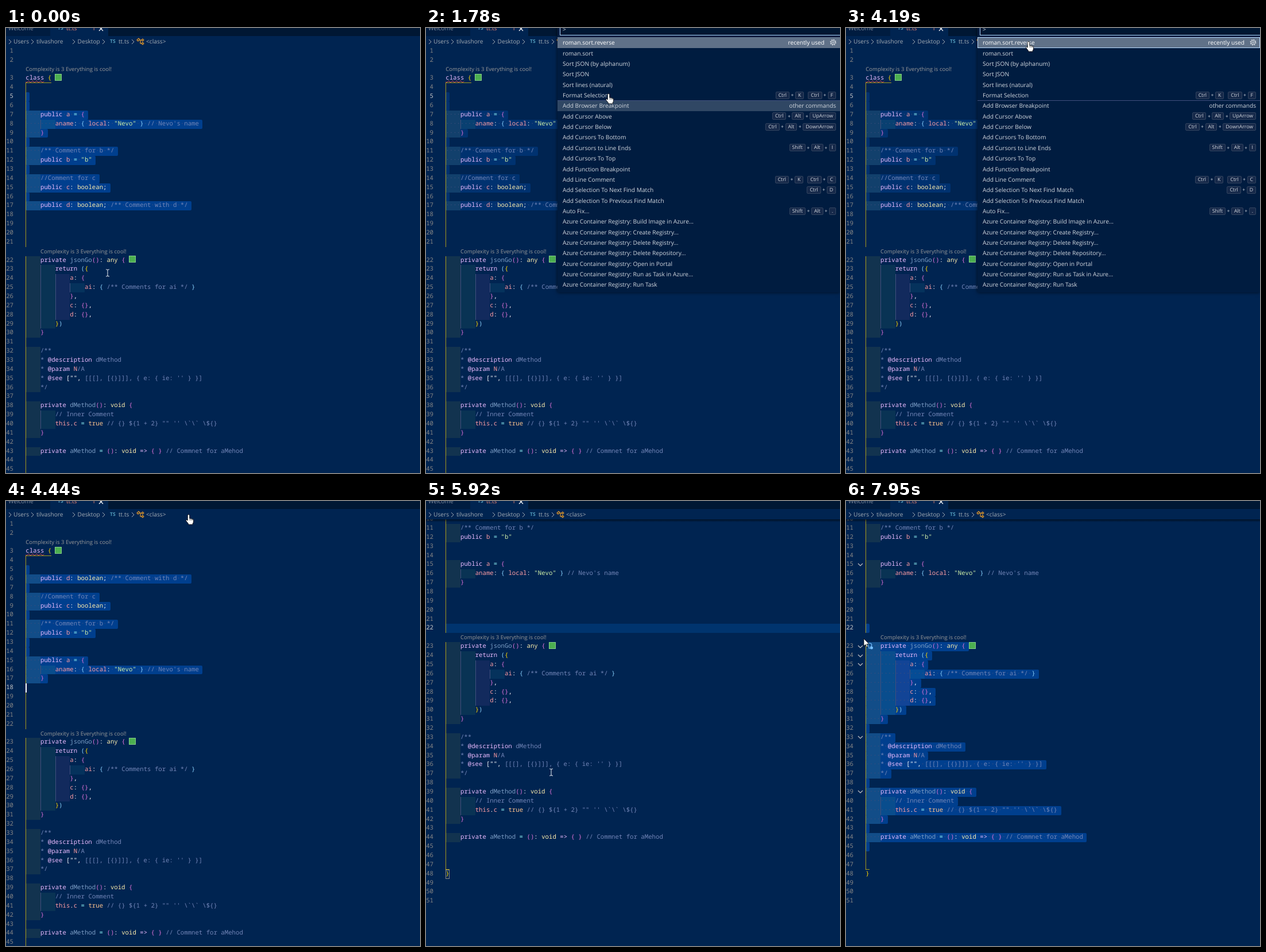
Recreate the animation shown at these times as an HTML page. Size 721x776 px, loop 8 s.

```html
<!DOCTYPE html>
<html lang="en">
<head>
<meta charset="utf-8">
<title>Sorting class members</title>
<style>
html, body { margin: 0; width: 100%; height: 100%; overflow: hidden; background: #002451; }
#stage { position: relative; width: 721px; height: 776px; overflow: hidden; background: #002451;
  font: 10.2px/18px "Open Sans", "Noto Sans", sans-serif; text-rendering: geometricPrecision; }
#stage div, #stage svg { position: absolute; white-space: pre; }
svg { overflow: visible; fill: none; }
#tabs { left: 0; top: 0; width: 721px; height: 14px; background: #001733; overflow: hidden; }
#crumbs { left: 0; top: 14px; height: 18px; color: #a3abb4; }
.ts { color: #519aba; font-weight: bold; font-size: 8.6px; }
#editor { left: 0; top: 32px; width: 721px; height: 744px; overflow: hidden; }
.row { left: 0; width: 721px; height: 15.86px; line-height: 15.86px;
  font-family: "Noto Sans Mono", "DejaVu Sans Mono", monospace; font-size: 10.7px; }
.row > div { top: 0; height: 100%; }
.num { right: 708px; color: #858585; }
.num.on { color: #c6c6c6; }
.code { left: 34.3px; color: #fff; }
.code i { font-style: normal; color: #404f7d; }
.error { text-decoration: underline wavy #f14c4c 1px; text-underline-offset: 1px; }
.sel { border-radius: 2px; }
.row > .lens { font: 9.57px/15.86px "Open Sans", "Noto Sans", sans-serif; color: #999; }
.row > .badge { top: -.4px; width: 10px; height: 10px; background: #4caf50; border: 1px solid #86cf89; }
.row > .match { top: .5px; width: 5.4px; height: 13.5px; border: 1px solid #888; }
#shade { left: 0; top: 32px; width: 721px; height: 5px; background: linear-gradient(#0008, #0000); }
#palette { left: 229px; top: -10px; width: 492px; height: 471px; background: #001c40;
  box-shadow: 0 0 6px #000a; color: #d3d8df; }
#input { left: 4px; top: 0; width: 500px; height: 21px; border: 1px solid #bbdaff; background: #001733; }
.item { left: 0; width: 492px; height: 18.35px; line-height: 18.35px; }
.item > div { top: 0; }
.item.hover { background: #304764; }
.item.focus { background: #607188; color: #fff; }
.item.outline { box-shadow: inset 0 0 0 1px #bbdaff; }
#stage .keys { right: 7px; display: flex; align-items: center; height: 18.35px; font-size: 8.7px; }
.keys b { font-weight: normal; height: 11px; line-height: 11px; padding: 0 4px; border-radius: 2px;
  border: 1px solid #33445f; background: #16294a; }
.keys span { margin: 0 2.5px; }
.keys em { width: 7px; }
</style>
</head>
<body>
<div id="stage">
  <div id="tabs"></div>
  <div id="crumbs"></div>
  <div id="editor"></div>
  <div id="shade"></div>
  <div id="palette"></div>
  <svg id="pointer" width="1" height="1"></svg>
</div>
<script>
const LOOP = 8000, ROW = 15.86, CHAR = 6.42, LEFT = 34.3, NOTCH = 41.8, ITEM = 18.35;
const $ = id => document.getElementById(id);
const box = (cls, left, style = '', html = '') => `<div class="${cls}" style="left:${left}px;${style}">${html}</div>`;
const svg = (x, y, body) => `<svg width="1" height="1" style="left:${x}px;top:${y}px">${body}</svg>`;
const path = (d, stroke, width = 1, fill = 'none') =>
  `<path d="${d}" stroke="${stroke}" stroke-width="${width}" fill="${fill}"/>`;

// Document text
const membersA = `    public a = {
        aname: { local: "Nevo" } // Nevo's name
    }`;
const membersB = `    /** Comment for b */
    public b = "b"`;
const membersC = `    //Comment for c
    public c: boolean;`;
const membersD = `    public d: boolean; /** Comment with d */`;
const tail = `    private jsonGo(): any {
        return ({
            a: {
                ai: { /** Comments for ai */ }
            },
            c: {},
            d: {},
        })
    }

    /**
    * @description dMethod
    * @param N/A
    * @see ["", [[[], [{}]]], { e: { ie: '' } }]
    */

    private dMethod(): void {
        // Inner Comment
        this.c = true // {} \${1 + 2} "" '' \\\`\\\` \\\${}
    }

    private aMethod = (): void => { } // Commnet for aMehod



}


`;
const blank = n => '\n'.repeat(n);
const before = ('\n\nclass {' + blank(4) + [membersA, membersB, membersC, membersD].join('\n\n') + blank(5) + tail).split('\n');
const after = ('\n\nclass {' + blank(3) + [membersD, membersC, membersB].join('\n\n') + blank(3) + membersA + blank(6) + tail).split('\n');

// Syntax colours
const COMMENT = '#7285b7', KEYWORD = '#ebbbff', VARIABLE = '#ff9da4';
const TOKEN = /(\/\/.*|\/\*.*?\*\/)|("[^"]*")|\b(class|public|private|return)\b|(=>)|\b(boolean|any|void)\b|\b(true)\b|\b(jsonGo|dMethod|aMethod)\b|(\w+)|(=)|([(){}])|(.)/g;
const COLORS = [COMMENT, '#d1f1a9', KEYWORD, KEYWORD, '#ffeead', '#ffc58f', '#7c9dc5', VARIABLE, '#9ff', '', '#fff'];
const DOC = /(@\w+)|(\["",)|(N)(?=\/A)|([^@N\[]+|.)/g;
const DOC_COLORS = [KEYWORD, '#fff', VARIABLE, COMMENT];
const BRACKETS = ['gold', 'orchid', 'lightskyblue'];

function tokenize(lines) {
  let depth = 0;
  return lines.map(line => {
    const doc = /^\s*(\/\*\*$|\*)/.test(line);
    return [...line.matchAll(doc ? DOC : TOKEN)].map(m => {
      const kind = m.slice(1).findIndex(g => g !== undefined);
      let color = (doc ? DOC_COLORS : COLORS)[kind];
      if (!color) color = BRACKETS[('({'.includes(m[0]) ? depth++ : --depth) % 3];
      return { text: m[0], start: m.index, color };
    });
  });
}
const docs = [before, after].map(lines => ({ lines, tokens: tokenize(lines) }));

const escapeChar = c => ({ '<': '&lt;', '>': '&gt;', '&': '&amp;' })[c] || c;
const tokenHtml = (tok, from) => {
  const chars = [...tok.text].map((c, i) => c === ' ' && tok.start + i >= from ? '<i>·</i>' : escapeChar(c));
  return `<span${tok.text === 'class' ? ' class="error"' : ''} style="color:${tok.color}">${chars.join('')}</span>`;
};

const TINTS = ['255,255,64', '127,255,127', '255,127,255', '79,236,236'];
const GUIDE = 'rgba(255,215,0,.65)';
const colX = col => LEFT + col * CHAR;

function lineHtml(s, doc, i) {
  const line = doc.lines[i], n = i + 1;
  const open = doc.lines.indexOf('class {'), close = doc.lines.indexOf('}');
  const selected = s.sel && n >= s.sel[0] && n <= s.sel[2];
  const from = selected ? (n === s.sel[0] ? s.sel[1] : 0) : Infinity;
  let h = '';
  if (s.current === n) h += box('', 34, 'width:687px;background:#00346e');
  if (selected) h += box('sel', colX(from),
    `width:${(line.length - from + 1) * CHAR}px;background:${s.palette ? '#003270' : '#003f8e'}`);
  const levels = line.trim() ? line.search(/\S/) / 4 : 0;
  for (let k = 0; k < levels; k++) {
    h += box('', colX(4 * k), `width:${4 * CHAR}px;background:rgba(${TINTS[k]},.07)`);
    if (k) h += box('', colX(4 * k), 'width:1px;background:#404f7d');
  }
  if (i > open && i < close) h += box('', 34, `width:1px;background:${GUIDE}`);
  if (i === open) h += box('', 34, `top:14.8px;height:1px;width:45px;background:${GUIDE}`);
  if (i === close) h += box('', 34, `top:-.5px;height:1px;width:7px;background:${GUIDE}`);
  if (s.match && (i === open || i === close)) h += box('match', colX(line.length - 1) - .4);
  h += `<div class="num${s.head[0] === n ? ' on' : ''}">${n}</div>`;
  h += `<div class="code">${doc.tokens[i].map(t => tokenHtml(t, from)).join('')}</div>`;
  if (/class|jsonGo/.test(line)) h += box('badge', colX(line.length) + 6);
  if (s.caret && s.head[0] === n) h += box('', colX(s.head[1]) - .3, 'width:2px;background:#fff');
  if (s.folds && /(\{|\/\*\*)$/.test(line))
    h += svg(21, 5.5, `<g opacity="${s.folds}">${path('M0 0L4 4L8 0', '#c5c5c5', 1.1)}</g>`);
  if (s.bulb && /jsonGo/.test(line))
    h += svg(37, 1, path('M3 7.5C0 5 1 1 4.5 1S9 5 6 7.5V10H3Z', '#75beff', 1.2)
      + '<circle cx="7.5" cy="9" r="2.5" fill="#75beff"/>');
  return h;
}

function drawEditor(s) {
  const doc = docs[s.sorted ? 1 : 0];
  let y = .77 - s.scroll * NOTCH, html = '';
  const row = inner => { html += `<div class="row" style="top:${y}px">${inner}</div>`; y += ROW; };
  doc.lines.forEach((line, i) => {
    if (/class|jsonGo/.test(line))
      row(box('lens', colX(line.search(/\S/)), '', 'Complexity is 3 Everything is cool!'));
    row(lineHtml(s, doc, i));
  });
  $('editor').innerHTML = html;
  $('shade').hidden = !s.scroll;
}

// Command palette
const registry = 'Azure Container Registry: ';
const ITEMS = ['roman.sort.reverse', 'roman.sort', 'Sort JSON (by alphanum)', 'Sort JSON', 'Sort lines (natural)',
  'Format Selection|Ctrl+K Ctrl+F', 'Add Browser Breakpoint', 'Add Cursor Above|Ctrl+Alt+UpArrow',
  'Add Cursor Below|Ctrl+Alt+DownArrow', 'Add Cursors To Bottom', 'Add Cursors to Line Ends|Shift+Alt+I',
  'Add Cursors To Top', 'Add Function Breakpoint', 'Add Line Comment|Ctrl+K Ctrl+C',
  'Add Selection To Next Find Match|Ctrl+D', 'Add Selection To Previous Find Match', 'Auto Fix...|Shift+Alt+.',
  ...['Build Image in Azure...', 'Create Registry...', 'Delete Registry...', 'Delete Repository...',
    'Open in Portal', 'Run as Task in Azure...', 'Run Task'].map(name => registry + name)];
const keysHtml = keys => keys.split(' ').map(chord =>
  chord.split('+').map(k => `<b>${k}</b>`).join('<span>+</span>')).join('<em></em>');
const gear = svg(480, 9.2, '<circle r="4.6" stroke="#d3d8df" stroke-width="1.8" stroke-dasharray="1.8 1.81"/>'
  + '<circle r="3.6" stroke="#d3d8df"/><circle r="1.4" stroke="#d3d8df"/>');

function drawPalette(s) {
  $('palette').hidden = !s.palette;
  if (!s.palette) return;
  let html = '<div id="input"></div>' + box('', 9, 'top:3px', '&gt;');
  if (s.blink) html += box('', 16, 'top:6px;width:1px;height:12px;background:#fff');
  ITEMS.forEach((item, i) => {
    const [label, keys] = item.split('|');
    const cls = i ? (s.hover === i ? ' hover' : '') : ' focus' + (s.outline ? ' outline' : '');
    let inner = box('', 9, '', label);
    if (keys) inner += `<div class="keys">${keysHtml(keys)}</div>`;
    if (i === 0) inner += '<div style="right:27px">recently used</div>' + gear;
    if (i === 6) inner += '<div style="right:7px">other commands</div>'
      + box('', 0, 'width:492px;height:1px;background:#404f7d');
    html += `<div class="item${cls}" style="top:${26.3 + i * ITEM}px">${inner}</div>`;
  });
  $('palette').innerHTML = html;
}

// Window chrome
function drawChrome() {
  const text = (x, y, label, style = '', cls = '') => box(cls, x, `top:${y}px;${style}`, label);
  $('tabs').innerHTML = box('', 0, 'top:0;width:77px;height:14px;background:#001c40')
    + box('', 77, 'top:0;width:101px;height:14px;background:#002451')
    + text(4, -9, 'Welcome', 'color:#7f8b9d') + text(90, -9, 'TS', '', 'ts')
    + text(105, -9, 'tt.ts', 'color:#f48771') + text(150, -9, '1', 'color:#f48771')
    + svg(162, -2, path('M0 0L7 7M7 0L0 7', '#fff', 1.2));
  const chevrons = [4.5, 43.5, 115.5, 168, 218.5].map(x => svg(x, 6, path('M0 0L4 4L0 8', '#a3abb4'))).join('');
  const icon = path('M4 3H9M6 3V9H9', '#ee9d28', 1.2)
    + path('M0 3L3 0L5 2L2 5ZM8 3L10 1L12 3L10 5ZM8 9L10 7L12 9L10 11Z', '#ee9d28', 1.1);
  $('crumbs').innerHTML = chevrons + text(13, 0, 'Users') + text(53, 0, 'tilvashore') + text(124.5, 0, 'Desktop')
    + text(181, 0, 'TS', '', 'ts') + text(196, 0, 'tt.ts') + svg(228, 4, icon) + text(244, 0, '&lt;class&gt;');
}

// Pointer shapes
const SHAPES = {
  beam: path('M-3 -6Q0 -6 0 -4.5Q0 -6 3 -6M0 -5V5M-3 6Q0 6 0 4.5Q0 6 3 6', '#d8dde6', 1.1),
  hand: path('M0 -1.5Q1.7 -1.5 1.7 .5V5.5Q3 5 4 6Q5.3 5.4 6.2 6.6Q8.4 6.4 8.4 8.5V11.5Q8.4 13 7.2 14V16H-.5V14.5L-4.4 9.6Q-5 8 -3.4 7.8L-1.7 9V.5Q-1.7 -1.5 0 -1.5Z', '#000', .8, '#fff')
    + path('M2 6V9M4.2 6.5V9M6.3 7V9', '#000', .6),
  arrow: path('M0 0V13L3 10.3L5 15L7 14.1L5 9.6H9.3Z', '#000', .8, '#fff')
};

const POINTER = [[0, 'beam', 177, 427], [1390, 'beam', 200, 390], [1510, 'hand', 262, 325], [1630, 'hand', 300, 261],
  [1780, 'hand', 318, 116], [1920, 'hand', 322, 62], [2060, 'hand', 321, 52], [2190, 'hand', 319, 40],
  [2310, 'hand', 318, 30], [2430, 'hand', 317.5, 24.5], [4590, 'beam', 310, 80], [4750, 'beam', 308, 250],
  [4880, 'beam', 302, 423], [5020, 'beam', 274, 403], [5160, 'beam', 269, 388], [5290, 'beam', 268, 385],
  [5920, 'beam', 218, 473], [6070, 'beam', 254, 569], [6220, 'beam', 294, 595], [6370, 'beam', 190, 604],
  [6490, 'beam', 103, 612], [6640, 'beam', 102.5, 612.5], [6940, 'beam', 50, 355], [7060, 'beam', 42, 310],
  [7180, 'beam', 37, 280], [7300, 'arrow', 32, 258], [7420, 'arrow', 31, 246], [7670, 'arrow', 31, 240]];

const drag = (line, col) => ({ head: [line, col], sel: [line, col, 45], caret: true });
const EDITOR = [
  [0, { head: [5, 0], sel: [5, 0, 17], scroll: 0 }],
  [150, { caret: true }], [580, { caret: false }],
  [830, { palette: true, blink: true }], [1390, { blink: false }],
  [1510, { hover: 16 }], [1630, { hover: 13 }], [1780, { hover: 6 }],
  [1920, { hover: 2, blink: true }], [2060, { hover: 1 }], [2310, { hover: 0 }],
  [2430, { blink: false }], [2970, { blink: true }], [3520, { blink: false }], [3930, { blink: true }],
  [4190, { blink: false, outline: true }], [4320, { palette: false }],
  [4440, { sorted: true, head: [18, 0], caret: true }], [4590, { caret: false }], [4880, { caret: true }],
  [5290, { head: [22, 0], sel: null, current: 22, match: true }],
  [5560, { scroll: 1 }], [5680, { scroll: 2 }], [5800, { scroll: 3, caret: false }], [5920, { scroll: 4 }],
  [6220, { caret: true }], [6790, { head: [46, 0], current: 46 }],
  [6940, { ...drag(33, 4), current: 0 }], [7060, { ...drag(29, 2), match: false }],
  [7180, drag(26, 0)], [7300, drag(25, 0)], [7420, drag(23, 0)], [7550, { ...drag(22, 0), folds: .25 }],
  [7670, { folds: .5, bulb: true }], [7830, { folds: .8 }], [7950, { folds: 1, caret: false }]];

const indexAt = (track, t) => track.findLastIndex(step => step[0] <= t);
let shownEditor = -1, shownPointer = -1;

function frame(now) {
  const t = now % LOOP;
  const e = indexAt(EDITOR, t), p = indexAt(POINTER, t);
  if (e !== shownEditor) {
    shownEditor = e;
    const state = Object.assign({}, ...EDITOR.slice(0, e + 1).map(step => step[1]));
    drawEditor(state);
    drawPalette(state);
  }
  if (p !== shownPointer) {
    shownPointer = p;
    const [, shape, x, y] = POINTER[p];
    $('pointer').innerHTML = SHAPES[shape];
    $('pointer').style.cssText = `left:${x}px;top:${y}px`;
  }
}

drawChrome();
const start = performance.now();
const tick = () => { frame(Math.max(0, performance.now() - start)); requestAnimationFrame(tick); };
tick();
</script>
</body>
</html>
```
